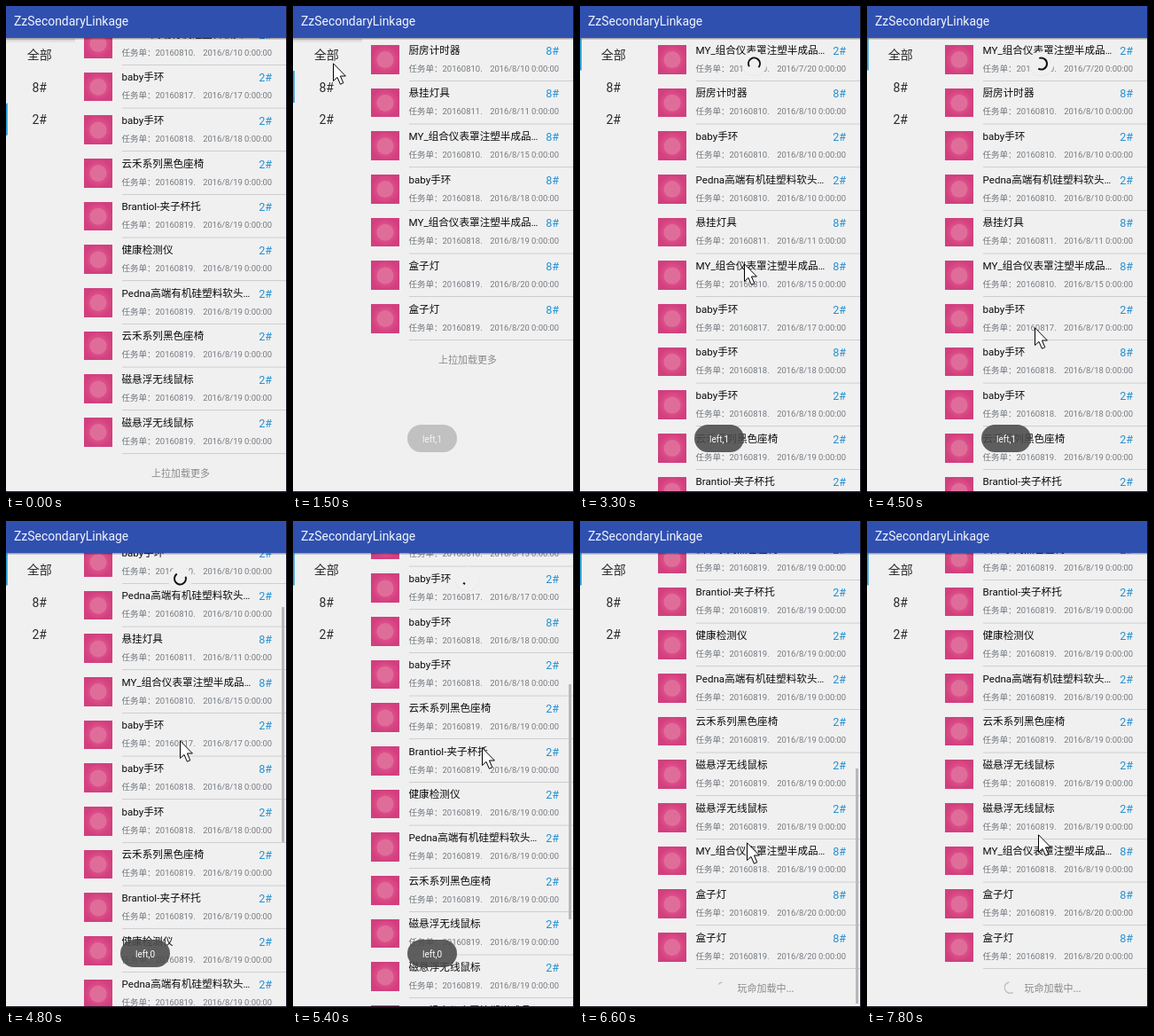
An HTML page for the animation above (8000 ms loop, 317x549 px).

```html
<!DOCTYPE html>
<html lang="zh-CN">
<head>
<meta charset="utf-8">
<title>ZzSecondaryLinkage</title>
<style>
html, body { margin: 0; width: 100%; height: 100%; overflow: hidden; background: #f0f0f0; }
svg { display: block; width: 317px; height: 549px; font-family: Roboto, "Noto Sans CJK SC", "Noto Sans CJK", sans-serif; }
.name { font-size: 11.6px; fill: #0c0c0c; }
.tag { font-size: 12.6px; fill: #2390d2; text-anchor: end; }
.sub { font-size: 9.5px; fill: #74797f; font-family: Roboto, "Noto Sans CJK TC", "Noto Sans CJK", sans-serif; }
.end { font-size: 9.4px; text-anchor: end; }
.side { font-size: 14px; fill: #2b2b2b; text-anchor: middle; }
.foot { font-size: 11px; font-weight: 500; fill: #8b8b8b; text-anchor: middle; }
</style>
</head>
<body>
<svg id="stage" viewBox="0 0 317 549">
  <defs>
    <radialGradient id="pink">
      <stop offset="0" stop-color="#e0608f"/>
      <stop offset=".65" stop-color="#dc4c88"/>
      <stop offset="1" stop-color="#d13f7e"/>
    </radialGradient>
    <linearGradient id="shade" x2="0" y2="1">
      <stop offset="0" stop-color="#cfcfcf"/>
      <stop offset="1" stop-color="#f0f0f0"/>
    </linearGradient>
    <linearGradient id="drop" x2="0" y2="1">
      <stop offset="0" stop-opacity=".4"/>
      <stop offset="1" stop-opacity="0"/>
    </linearGradient>
    <clipPath id="view"><rect y="36" width="316" height="511"/></clipPath>
  </defs>
  <rect width="317" height="549" fill="#f0f0f0"/>
  <g id="left">
    <rect id="shadow" y="37" width="78" height="5" fill="url(#shade)"/>
    <rect id="mark" width="1.8" height="36" fill="#2a9fd6"/>
  </g>
  <g clip-path="url(#view)">
    <g id="list"></g>
    <text id="more" class="foot" x="197"></text>
    <path id="wait" fill="none" stroke="#b9b9b9" stroke-width="1.2"/>
    <rect id="bar" x="311" width="3" height="265" fill="#b8b8b8"/>
    <g id="spin">
      <circle r="13.8" cx="196.5" cy=".6" fill="#e6e6e6"/>
      <circle r="13.6" cx="196.5" fill="#f0f0f0"/>
      <path id="ring" fill="none" stroke="#111" stroke-width="2"/>
    </g>
  </g>
  <rect width="316" height="36" fill="#3050b0"/>
  <rect y="36" width="316" height="2.5" fill="url(#drop)"/>
  <text x="9" y="22.3" font-size="13.95" fill="#f2f4fb">ZzSecondaryLinkage</text>
  <g id="toast">
    <rect x="129" y="472" width="56" height="31" rx="15.5" fill="#4a4a4a" fill-opacity=".88"/>
    <text id="msg" x="157" y="491.5" font-size="10" fill="#fff" text-anchor="middle"></text>
  </g>
  <path id="arrow" d="M.5 .8V20.5L5 16.4 8.4 24.2 11.8 22.7 8.4 15H14.4Z" fill="#fff" stroke="#000"/>
  <path d="M316 0h1v549H0v-2h316Z" fill="#17131f"/>
</svg>
<script>
const $ = id => document.getElementById(id);
const LOOP = 8000, STEP = 300, PITCH = 146 / 3, TOP = 49.3;

function add(parent, tag, attrs, text) {
  const el = document.createElementNS("http://www.w3.org/2000/svg", tag);
  set(el, attrs);
  if (text) el.textContent = text;
  parent.appendChild(el);
  return el;
}
function set(el, attrs) { for (const k in attrs) el.setAttribute(k, attrs[k]); }
function show(el, on) { el.style.display = on ? "" : "none"; }

// name, group, order day, date
const PANEL = "MY_组合仪表罩注塑半成品…", BAND = "baby手环", CUP = "Pedna高端有机硅塑料软头…";
const CHAIR = "云禾系列黑色座椅", MOUSE = "磁悬浮无线鼠标", LAMP = "盒子灯";
const items = [
  [PANEL, 2, "0720", "7/20"], ["厨房计时器", 8, "0810", "8/10"], [BAND, 2, "0810", "8/10"],
  [CUP, 2, "0810", "8/10"], ["悬挂灯具", 8, "0811", "8/11"], [PANEL, 8, "0810", "8/15"],
  [BAND, 2, "0817", "8/17"], [BAND, 8, "0818", "8/18"], [BAND, 2, "0818", "8/18"],
  [CHAIR, 2, "0819", "8/19"], ["Brantiol-夹子杯托", 2, "0819", "8/19"], ["健康检测仪", 2, "0819", "8/19"],
  [CUP, 2, "0819", "8/19"], [CHAIR, 2, "0819", "8/19"], [MOUSE, 2, "0819", "8/19"],
  [MOUSE, 2, "0819", "8/19"], [PANEL, 8, "0818", "8/19"], [LAMP, 8, "0819", "8/20"],
  [LAMP, 8, "0819", "8/20"]
];

const rows = items.map(([name, group, order, date]) => {
  const g = add($("list"), "g", {});
  const icon = add(g, "rect", { x: 88, width: 32, fill: "url(#pink)" });
  add(g, "circle", { cx: 104, cy: 11.3, r: 9.5, fill: "#df6d99" });
  add(g, "text", { class: "name", x: 130.5, y: 4.3 }, name);
  add(g, "text", { class: "tag", x: 300, y: 5.3 }, group + "#");
  add(g, "text", { class: "sub", x: 130.5, y: 24.4 }, "任务单：2016" + order + ".");
  add(g, "text", { class: "sub end", x: 300, y: 24.4 }, "2016/" + date + " 0:00:00");
  add(g, "rect", { x: 131, y: 34.75, width: 185, height: .66, fill: "#bcbcbc" });
  return { group, g, icon };
});

["全部", "8#", "2#"].forEach((t, i) =>
  add($("left"), "text", { class: "side", x: 37.7, y: 60 + i * 36.6 }, t));

// changes by step; each value holds until replaced
const changes = {
  0: { tab: 2, scroll: 115.33, pos: null, toast: 0, msg: "left,1", spin: null, bar: 0, wait: null },
  2: { pos: [23, 75] },
  3: { pos: [42, 88] },
  5: { pos: [45, 64], tab: 1, scroll: 0, toast: .32 },
  6: { toast: 1 },
  7: { pos: [49, 67], tab: 0 },
  8: { pos: [151, 106] },
  9: { pos: [177, 145] },
  10: { pos: [182, 263], spin: [79, 0, 285] },
  11: { pos: [185, 290], spin: [65, 150, 400] },
  12: { pos: [187, 311], spin: [65, 300, 420] },
  13: { pos: [163, 467], spin: [65, 20, 270] },
  14: { pos: [188, 374], spin: [65, 200, 300] },
  15: { pos: [189, 362], spin: [65, 250, 480] },
  16: { pos: [196, 247], spin: [65, -20, 235], scroll: 111.33, msg: "left,0", bar: 1 },
  17: { pos: [206, 300], spin: [65, 60, 220], scroll: 195 },
  18: { pos: [213, 255], spin: [65, 112, 132], scroll: 276.67 },
  19: { pos: [205, 345], spin: null, scroll: 335 },
  20: { pos: [195, 431], scroll: 372 },
  21: { pos: [190, 372], scroll: 425 },
  22: { pos: [188, 362], scroll: 456, toast: 0, wait: 215 },
  23: { bar: 0, wait: 190 },
  24: { wait: 165 },
  25: { wait: 115 },
  26: { pos: [193, 353], wait: 60 }
};
const states = [];
for (let i = 0; i * STEP < LOOP; i++) states.push({ ...states[i - 1], ...changes[i] });

function arc(cx, cy, r, from, to) {
  const at = d => {
    const a = d * Math.PI / 180;
    return (cx + r * Math.cos(a)).toFixed(2) + " " + (cy + r * Math.sin(a)).toFixed(2);
  };
  return `M${at(from)}A${r} ${r} 0 ${to - from > 180 ? 1 : 0} 1 ${at(to)}`;
}

function draw(s) {
  const group = [0, 8, 2][s.tab];
  let n = 0;
  for (const row of rows) {
    const on = !group || row.group === group;
    show(row.g, on);
    if (!on) continue;
    const y = TOP + n++ * PITCH - s.scroll;
    // icon edges sit on whole pixels
    const top = Math.floor(y - 4.95), bottom = Math.floor(y + 27.75);
    set(row.g, { transform: `translate(0 ${y})` });
    set(row.icon, { y: top - y, height: bottom - top });
  }
  const footY = Math.round(TOP + n * PITCH - s.scroll + 7.6);
  const waiting = s.wait !== null;
  $("more").textContent = waiting ? "玩命加载中..." : "上拉加载更多";
  set($("more"), { x: waiting ? 209.5 : 197, y: footY + 4.6 });
  show($("wait"), waiting);
  if (waiting) set($("wait"), { d: arc(161.5, footY, 6.3, s.wait, 260) });

  show($("bar"), s.bar);
  set($("bar"), { y: Math.round(38 + s.scroll * .528) });
  show($("shadow"), s.tab > 0);
  set($("mark"), { y: 36.5 + s.tab * 36.6 });

  show($("spin"), s.spin);
  if (s.spin) {
    const [y, from, to] = s.spin;
    set($("spin"), { transform: `translate(0 ${y})` });
    set($("ring"), { d: arc(196.5, 0, 6.5, from, to) });
  }
  set($("toast"), { opacity: s.toast });
  $("msg").textContent = s.msg;
  show($("arrow"), s.pos);
  if (s.pos) set($("arrow"), { transform: `translate(${s.pos})` });
}

let last = -1;
const start = performance.now();
function tick() {
  const i = Math.floor((performance.now() - start) % LOOP / STEP);
  if (i !== last) draw(states[last = i]);
  requestAnimationFrame(tick);
}
tick();
</script>
</body>
</html>
```
